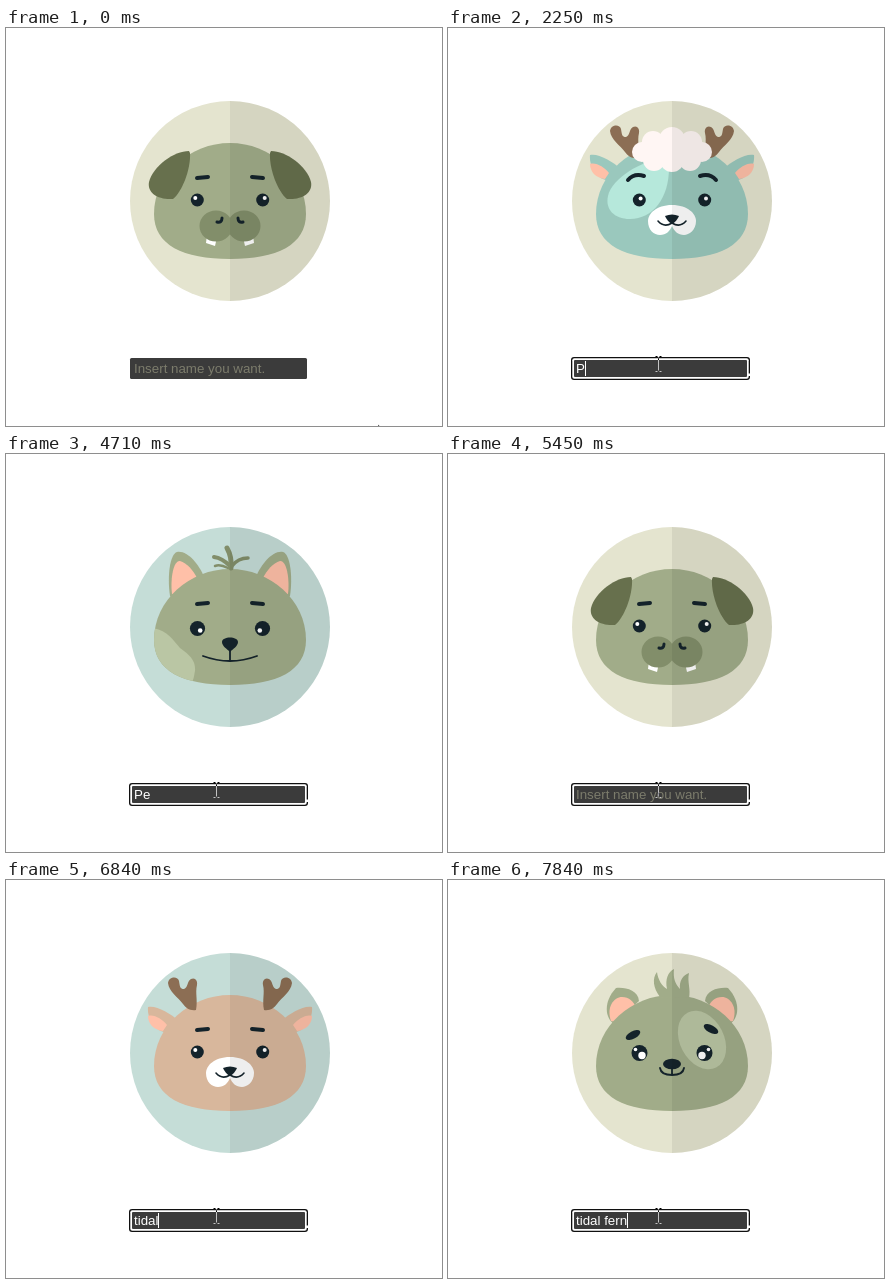
An HTML page for the animation above (8000 ms loop, 436x398 px).

```html
<!DOCTYPE html>
<html lang="en">
<head>
<meta charset="utf-8">
<title>Name to animal avatar</title>
<style>
html, body { margin: 0; width: 100%; height: 100%; overflow: hidden; background: #fff; }
svg { display: block; width: 100vw; height: 100vh; }
text { font: 13.333px "Liberation Sans", Arial, sans-serif; white-space: pre; }
#beam { mix-blend-mode: difference; }
</style>
</head>
<body>
<svg id="stage" viewBox="0 0 436 398">
  <defs>
    <clipPath id="head"><path d="M224 115C184 115 148 146 148 186C148 217 177 231 224 231S300 217 300 186C300 146 264 115 224 115Z"/></clipPath>
  </defs>
  <rect width="436" height="398" fill="#fff"/>
  <g id="avatars"></g>
  <path d="M224 73a100 100 0 0 1 0 200z" fill="#000" opacity=".068"/>
  <rect x="124" y="330" width="177" height="21" rx="1.5" fill="#3b3b3b"/>
  <g id="ring">
    <rect x="123" y="329" width="179" height="23" rx="3" fill="#101010"/>
    <rect x="124.3" y="330.3" width="176.4" height="20.4" rx="2" fill="#fff"/>
    <rect x="126" y="332" width="173" height="17" rx="1" fill="#3b3b3b"/>
    <rect x="300" y="345.5" width="2" height="2.5" fill="#fff"/>
  </g>
  <text id="hint" x="128" y="345" fill="#7c7c6c">Insert name you want.</text>
  <text id="typed" x="128" y="345" fill="#fff"></text>
  <rect id="caret" y="333" width="1" height="15" fill="#fff"/>
  <path id="arrow" d="M0 0V16L4 12.5L6.5 18.5L9 17.5L6.5 11.5H11.5Z" fill="#000" stroke="#fff" stroke-width=".8"/>
  <path id="beam" d="M-3 -8.5H-1M1 -8.5H3M0 -7.5V5.5M-3 6.5H-1M1 6.5H3" fill="none" stroke="#fff"/>
</svg>
<script>
const INK = '#14232b', PINK = '#ffc0a8', WHITE = '#fff';
const SAND = '#e4e4cf', ROSE = '#ece2e1', MINT = '#c5ddd7';
const HEAD = 'M224 115C184 115 148 146 148 186C148 217 177 231 224 231S300 217 300 186C300 146 264 115 224 115Z';
const coats = {
  green: { base: '#a1ac89', spot: '#bac6a4', deep: '#828e6a', dark: '#67704d' },
  teal:  { base: '#9ac8bd', spot: '#b6e8db', deep: '#7da99d', dark: '#628f84' },
  tan:   { base: '#d8b79c', spot: '#f4d4ba', deep: '#b59776', dark: '#8c6e54' }
};

const fill = (d, color) => `<path d="${d}" fill="${color}"/>`;
const line = (d, width, color = INK) =>
  `<path d="${d}" fill="none" stroke="${color}" stroke-width="${width}" stroke-linecap="round" stroke-linejoin="round"/>`;
const oval = (x, y, rx, ry = rx, color = INK, turn = 0) =>
  `<ellipse cx="${x}" cy="${y}" rx="${rx}" ry="${ry}" fill="${color}" transform="rotate(${turn} ${x} ${y})"/>`;
const pair = s => s + `<g transform="matrix(-1 0 0 1 448 0)">${s}</g>`;

const backEars = {
  deer: c => pair(fill('M142 127C150 125 164 133 173 141L158 152C148 150 141 138 142 127Z', c.base) +
    fill('M142 136C148 134 156 139 161 145L157 151C148 150 142 144 142 136Z', PINK)),
  cat: c => pair(fill('M164 142C161 122 164 100 171 98C181 96 193 110 198 123L168 145Z', c.base) +
    fill('M166 140C164 123 168 106 174 107C181 109 187 116 191 124L170 142Z', PINK)),
  bear: c => pair(fill('M168 108C177 107 190 110 191 121L166 144C157 138 155 122 168 108Z', c.base) +
    fill('M163 141C158 127 166 117 174 117C181 117 186 122 187 126L168 142Z', PINK))
};
const frontEars = {
  droop: c => pair(fill('M183 123C168 123 147 138 143 154C141 165 152 172 167 171C176 164 185 141 184 125Z', c.dark)),
  flop: c => pair(fill('M168 111C182 109 192 115 191 124L178 130Z', c.deep) +
    fill('M177 115C183 116 187 119 189 123L182 128L176 125Z', INK) +
    fill('M150 151C143 143 144 122 160 114C172 109 181 113 183 119C184 132 170 147 157 151Z', c.deep))
};
const antlers = pair(fill('M162 103C163 96 172 96 173 101C174 107 174 109 178 109C182 108 181 101 185 99C189 97 192 101 191 105C189 113 192 120 190 130C184 131 180 128 177 124C172 117 163 112 162 103Z', '#8c6e54'));
const hair = {
  antlers: () => antlers,
  wool: () => antlers + oval(224, 122, 34, 17, '#fff6f4') +
    pair([[194, 124, 10], [205, 114, 11], [206, 132, 11]].map(p => oval(...p, p[2], '#fff6f4')).join('')) +
    oval(224, 112, 13, 13, '#fff6f4') + oval(224, 132, 12, 12, '#fff6f4'),
  sprig: c => line('M225 114Q226 103 221 94', 5, c.deep) + line('M224 112Q216 104 208 103', 4, c.deep) +
    line('M226 112Q232 104 242 104', 3.5, c.deep) + line('M222 114Q214 110 209 112', 2.5, c.deep),
  tuft: c => fill('M212 117C205 108 204 98 209 92C210 100 214 106 219 109C217 99 220 92 226 89C225 98 227 104 232 109C231 101 235 95 241 93C239 102 243 109 241 118Z', c.base)
};
const spots = {
  cheek: c => fill('M221 140C221 170 205 191 182 191C166 191 157 181 160 168C164 150 195 132 212 132Q221 133 221 140Z', c.spot),
  jaw: c => fill('M146 174C160 175 168 187 174 194C184 201 190 207 189 217Q188 226 184 233H140Z', c.spot),
  eye: c => oval(254, 160, 22, 31, c.spot, -27)
};
const brows = {
  flat: () => pair(line('M191 150L202 149', 4)),
  arch: () => pair(line('M180 152Q186 145 196 148', 4)),
  bean: () => oval(185, 155, 8, 3.8, INK, -28) + oval(263, 149, 8, 3.8, INK, 28)
};
const eyePair = (x, y, r, dl, dr, dy, glint = 2.3) =>
  oval(x, y, r) + oval(448 - x, y, r) + oval(x + dl, y + dy, glint, glint, WHITE) + oval(448 - x + dr, y + dy, glint, glint, WHITE);
const eyes = {
  small: () => eyePair(191.3, 172, 6.5, -2, 2, -2, 2),
  bead: () => eyePair(191.3, 172, 6.5, 1.3, 1.3, -1.5, 2),
  round: () => eyePair(191.5, 178, 7.6, -2.5, -2.5, -2),
  inward: () => eyePair(191.5, 174.5, 7.6, 2.7, -2.7, 2),
  close: () => eyePair(196, 176, 7, -2, -2, -2),
  big: () => eyePair(191.5, 173, 8, 2.5, -2.5, 2.5, 3.7) + oval(187.5, 169.5, 1.8, 1.8, WHITE) + oval(260.5, 169.5, 1.8, 1.8, WHITE),
  arc: () => [0, 57].map(dx => `<g transform="translate(${dx})">` +
    fill('M189 180C187 172 190 165 196 165C201 165 204 172 202 180Q195 184 189 180Z', INK) +
    oval(198.5, 169.5, 2.3, 3.2, WHITE, -15) + '</g>').join('')
};
const muzzles = {
  hippo: c => pair(fill('M201 207L211 209L209 218L200 215Z', WHITE)) + pair(oval(210, 198, 16.5, 15.5, c.deep)) +
    pair(line('M211 194Q216 195 216 190', 3)),
  lamb: () => fill('M224 177C240 177 248 186 248 193C248 202 241 207 236 207C230 207 226 203 224 198C222 203 218 207 212 207C206 207 200 202 200 193C200 186 208 177 224 177Z', WHITE) +
    fill('M217 188Q224 185 231 188Q229 193 224 196Q219 193 217 188Z', INK) + line('M210 193Q216 200 224 195Q232 200 238 193', 1.6),
  boar: c => pair(fill('M196 191C192 204 198 214 213 216L209 207C200 205 198 199 196 191Z', WHITE)) +
    oval(224, 202, 17, 15, c.deep) + pair(oval(216, 207, 3)),
  cat: () => fill('M216 188C216 182 232 182 232 188C232 192 227 195 224 198C221 195 216 192 216 188Z', INK) +
    line('M224 196V206M197 202Q224 212 251 202', 1.8),
  heart: () => fill('M224 195L213 188C208 181 216 174 224 182C232 174 240 181 235 188Z', INK) +
    line('M224 193V208Q238 207 243 195M240 195L245 196', 1.8),
  smirk: () => fill('M217 187C216 181 220 178 224 178C229 178 232 181 231 187C230 190 218 190 217 187Z', INK) +
    line('M224 189Q224 196 229 200', 1.5) + fill('M221 203Q231 198 238 196Q241 197 238 199Q231 202 221 203Z', INK),
  smile: () => oval(224, 184, 9, 5.2) + line('M224 187V194M212 188Q213 195 224 195Q235 195 236 188', 1.8)
};

// background, coat, ears, hair, spot, brows, eyes, muzzle
const animals = {
  '':           [SAND, 'green', 'droop', '', '', 'flat', 'small', 'hippo'],
  'P':          [SAND, 'teal', 'deer', 'wool', 'cheek', 'arch', 'bead', 'lamb'],
  'Pe':         [MINT, 'green', 'cat', 'sprig', 'jaw', 'flat', 'inward', 'cat'],
  'Pet':        [ROSE, 'teal', 'deer', 'antlers', '', 'arch', 'round', 'boar'],
  't':          [SAND, 'tan', 'droop', '', '', 'arch', 'round', 'smirk'],
  'ti':         [MINT, 'tan', 'cat', 'sprig', 'cheek', 'arch', 'close', 'heart'],
  'tid':        [ROSE, 'green', 'bear', 'tuft', '', 'flat', 'inward', 'boar'],
  'tida':       [SAND, 'teal', 'flop', '', 'jaw', 'arch', 'big', 'smile'],
  'tidal':      [MINT, 'tan', 'deer', 'antlers', '', 'flat', 'small', 'lamb'],
  'tidal ':     [ROSE, 'green', 'cat', 'sprig', 'eye', 'bean', 'round', 'cat'],
  'tidal f':    [MINT, 'green', 'flop', '', '', 'arch', 'arc', 'smirk'],
  'tidal fe':   [ROSE, 'tan', 'bear', 'tuft', 'jaw', 'flat', 'big', 'heart'],
  'tidal fer':  [MINT, 'teal', 'cat', 'sprig', 'cheek', 'arch', 'inward', 'boar'],
  'tidal fern': [SAND, 'green', 'bear', 'tuft', 'eye', 'bean', 'big', 'smile']
};
const draw = ([back, coat, ear, top, spot, brow, eye, muzzle]) => {
  const c = coats[coat], part = (set, key) => set[key] ? set[key](c) : '';
  return oval(224, 173, 100, 100, back) + part(backEars, ear) + fill(HEAD, c.base) +
    `<g clip-path="url(#head)">${part(spots, spot)}</g>` + part(frontEars, ear) + part(hair, top) +
    part(brows, brow) + part(eyes, eye) + part(muzzles, muzzle);
};

const el = id => document.getElementById(id);
const names = Object.keys(animals);
el('avatars').innerHTML = names.map(n => `<g>${draw(animals[n])}</g>`).join('');
const groups = [...el('avatars').children];

// time, typed text, avatar shown when it lags behind the text
const keys = [
  [0, ''], [2250, 'P'], [2580, 'Pe'], [2780, 'Pet', 'Pe'], [2850, 'Pet'],
  [4650, 'Pe', 'Pet'], [4710, 'Pe'], [4840, 'P', 'Pe'], [4910, 'P'], [4980, '', 'P'], [5050, ''],
  [6180, 't'], [6380, 'ti'], [6580, 'tid'], [6710, 'tida'], [6840, 'tidal'], [7040, 'tidal '],
  [7240, 'tidal f'], [7370, 'tidal fe', 'tidal f'], [7440, 'tidal fe'], [7640, 'tidal fer'],
  [7770, 'tidal fern', 'tidal fer'], [7840, 'tidal fern']
];
const blinks = [[0, 0], [720, 1], [1250, 0], [1780, 1], [3320, 0], [3850, 1], [4380, 0], [4840, 1], [5450, 0], [5980, 1]];
const pointer = [
  [0, 372, 396], [70, 357, 388], [130, 335, 377], [190, 308, 365], [260, 280, 350], [330, 256, 345],
  [390, 233, 342], [450, 218, 340], [520, 210, 340], [720, 210, 334], [850, 210, 337]
];
const at = (table, t) => table.filter(row => row[0] <= t).pop();
const show = (node, on) => node.setAttribute('visibility', on ? 'visible' : 'hidden');
const widths = names.reduce((all, n) => {
  el('typed').textContent = n;
  all[n] = n ? el('typed').getComputedTextLength() : 0;
  return all;
}, {});

function render(t) {
  const [, text, shown = text] = at(keys, t);
  const [, x, y] = at(pointer, t);
  groups.forEach((g, i) => show(g, names[i] === shown));
  el('typed').textContent = text;
  show(el('hint'), !text);
  show(el('ring'), t >= 720);
  show(el('caret'), at(blinks, t)[1]);
  el('caret').setAttribute('x', Math.round(128 + widths[text]));
  const inField = y < 351 && x < 301;
  show(el('beam'), inField);
  show(el('arrow'), !inField);
  for (const id of ['beam', 'arrow']) el(id).setAttribute('transform', `translate(${x + (id === 'beam' ? .5 : 0)} ${y})`);
}

const start = performance.now();
function tick() {
  render((performance.now() - start) % 8000);
  requestAnimationFrame(tick);
}
tick();
</script>
</body>
</html>
```
